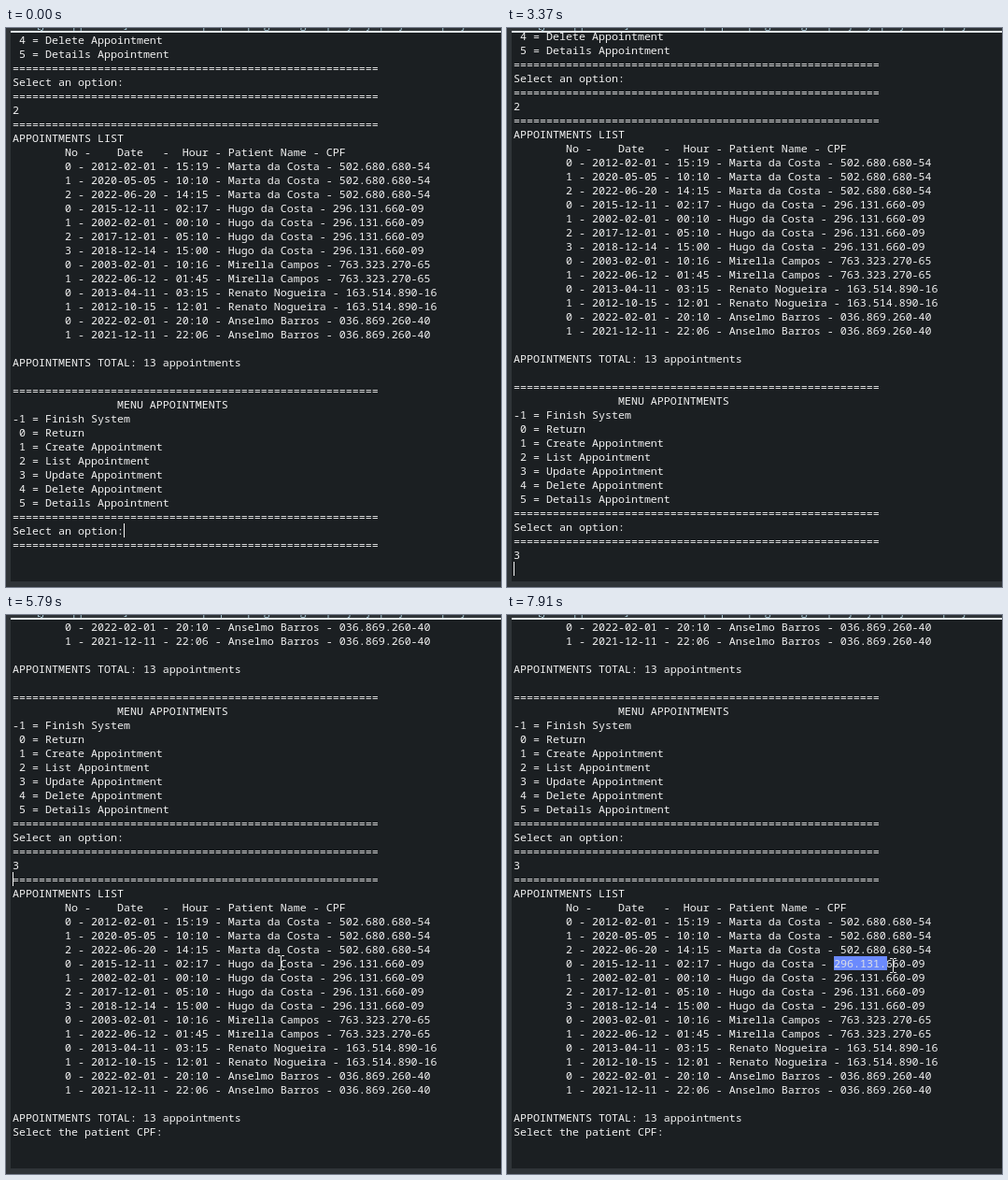
An HTML page that plays this animation: 530x598 px, repeating every 8000 ms.

```html
<!DOCTYPE html>
<html lang="en">
<head>
<meta charset="utf-8">
<title>Appointments console</title>
<style>
  html, body { margin: 0; width: 100%; height: 100%; overflow: hidden; background: #2f3438; }
  #stage { position: relative; width: 530px; height: 598px; overflow: hidden; background: #2f3438; }
  #stage div, #stage svg { position: absolute; }
  #title { left: 33px; top: -13px; font: 12px/17px "Open Sans", sans-serif; color: #a9c9d6; white-space: pre; }
  #rule { left: 5px; top: 3px; width: 525px; height: 2px; background: #dfe5e8; }
  #console { left: 5px; top: 5px; width: 525px; height: 587px; background: #1b1f22; overflow: hidden; }
  #text, #pick { font: 11.6667px/15px "Noto Sans Mono", "DejaVu Sans Mono", monospace; white-space: pre; }
  #text { left: 2px; color: #f2f2f2; }
  #pick { left: 350px; top: 365px; height: 15px; overflow: hidden; background: #6b8afd; color: #dcdfe6; }
  #caret { width: 1px; height: 15px; background: #f4f4f4; }
  #mouse { width: 7px; height: 16px; }
</style>
</head>
<body>
<div id="stage">
  <div id="title">[Java Application] C:\Users\me\.p2\pool\plugins\org.eclipse.justj.openjdk.hotspot.jre.full</div>
  <div id="rule"></div>
  <div id="console"><div id="text"></div></div>
  <div id="pick"></div>
  <div id="caret"></div>
  <svg id="mouse" viewBox="0 0 7 16" fill="none" stroke="#e4e4e4" shape-rendering="crispEdges">
    <path d="M0 .5H3M4 .5H7M3.5 1V15M0 15.5H3M4 15.5H7"/>
  </svg>
</div>
<script>
const LOOP = 8000, ROW = 15, COL = 7, LEFT = 7, TOP = 5;
const BLINK = 530, MOUSE_START = 5220, MOUSE_STEP = 140;
const [text, pick, caret, mouse] = ["text", "pick", "caret", "mouse"].map(id => document.getElementById(id));

const rule = "=".repeat(56);
const pad = " ".repeat(8);
const patients = [
  ["Marta da Costa", "502.680.680-54", ["2012-02-01 - 15:19", "2020-05-05 - 10:10", "2022-06-20 - 14:15"]],
  ["Hugo da Costa", "296.131.660-09", ["2015-12-11 - 02:17", "2002-02-01 - 00:10", "2017-12-01 - 05:10", "2018-12-14 - 15:00"]],
  ["Mirella Campos", "763.323.270-65", ["2003-02-01 - 10:16", "2022-06-12 - 01:45"]],
  ["Renato Nogueira", "163.514.890-16", ["2013-04-11 - 03:15", "2012-10-15 - 12:01"]],
  ["Anselmo Barros", "036.869.260-40", ["2022-02-01 - 20:10", "2021-12-11 - 22:06"]]
];
const list = [
  rule,
  "APPOINTMENTS LIST",
  pad + "No -    Date   -  Hour - Patient Name - CPF",
  ...patients.flatMap(([name, cpf, visits]) =>
    visits.map((visit, i) => `${pad}${i} - ${visit} - ${name} - ${cpf}`)),
  "",
  "APPOINTMENTS TOTAL: 13 appointments"
];
const actions = ["Create", "List", "Update", "Delete", "Details"]
  .map((verb, i) => ` ${i + 1} = ${verb} Appointment`);
const prompt = [rule, "Select an option:", rule];
const waiting = [
  ...actions.slice(3), ...prompt, "2", ...list, "",
  rule, pad + pad + "MENU APPOINTMENTS", "-1 = Finish System", " 0 = Return",
  ...actions, ...prompt
];
const answered = [...waiting, "3"];
const listed = [...answered, ...list, "Select the patient CPF:"];

// blink: when the caret's first full lit phase begins
const scenes = [
  { from: 0, lines: waiting, scroll: 0, col: 17, row: 35, blink: -150 },
  { from: 2500, lines: answered, scroll: 0, col: 1, row: 37, blink: 2520 },
  { from: 3370, lines: answered, scroll: 4, col: 0, row: 38, blink: 3370 },
  { from: 3490, lines: listed, scroll: 20 * ROW, col: 0, row: 38, blink: 3550 }
];

// Turning points of the mouse: step, x, y
const path = [
  [0, 479, 479], [1, 435, 479], [4, 291, 364], [6, 185, 374],
  [9, 158, 363], [12, 350, 369], [17, 349, 365], [19, 410, 367]
];

function mouseAt(step) {
  const i = path.findIndex(point => point[0] >= step);
  if (i < 1) return path[i < 0 ? path.length - 1 : 0].slice(1);
  const [a, b] = [path[i - 1], path[i]];
  const k = (step - a[0]) / (b[0] - a[0]);
  return [1, 2].map(n => Math.round(a[n] + (b[n] - a[n]) * k));
}

function place(el, visible, x, y) {
  el.style.display = visible ? "block" : "none";
  el.style.left = x + "px";
  el.style.top = y + "px";
}

let shown;
function draw(t) {
  const scene = scenes.findLast(s => s.from <= t);
  if (scene !== shown) {
    shown = scene;
    text.textContent = scene.lines.join("\n");
    text.style.top = -scene.scroll + "px";
  }

  const step = Math.floor((t - MOUSE_START) / MOUSE_STEP);
  const [x, y] = mouseAt(step);
  place(mouse, step >= 0, x, y);

  // Dragging starts after the mouse rests at the number.
  const count = step > 17 ? Math.floor((x - pick.offsetLeft) / COL) : 0;
  pick.textContent = patients[1][1].slice(0, count);
  pick.style.width = (count && count * COL + 1) + "px";

  const phase = Math.floor(Math.max(0, t - scene.blink) / BLINK);
  place(caret, phase % 2 === 0 && !count,
    LEFT + scene.col * COL, TOP + scene.row * ROW - scene.scroll);
}

const start = performance.now();
function tick() {
  draw((performance.now() - start) % LOOP);
  requestAnimationFrame(tick);
}
tick();
</script>
</body>
</html>
```
